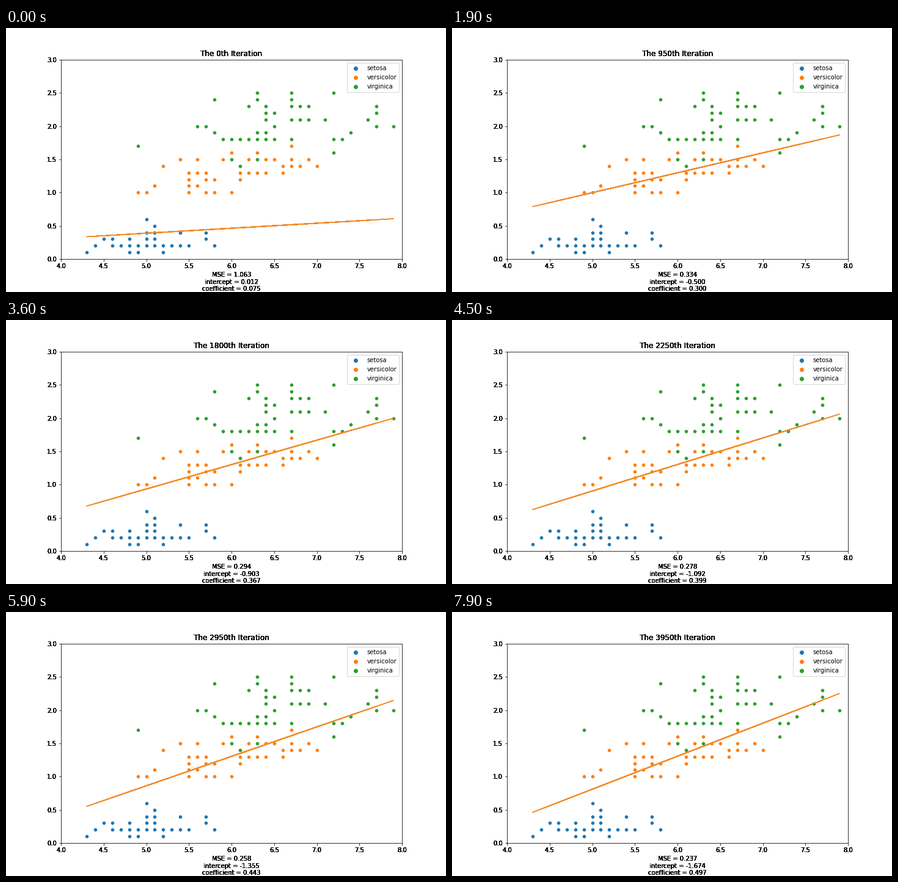
Recreate the animation shown at these times as a matplotlib script. Size 720x432 px, loop 8000 ms.

```python
import random

import matplotlib.pyplot as plt
from matplotlib.animation import FuncAnimation

plt.rcParams["font.family"] = "DejaVu Sans"

FRAMES, INTERVAL, STEPS = 80, 100, 50
RATE = 0.01

# Full-sample moments of x (sepal length) and y (petal width)
MEAN_X, MEAN_Y = 5.843333, 1.199333
VAR_X, VAR_Y, COV = 0.681122, 0.577133, 0.512829

# Rows of distinct points, in tenths: y -> x values
SPECIES = {
    "setosa": ("#1f77b4", {
        1: [43, 48, 49, 52],
        2: [44, *range(46, 56), 58],
        3: [45, 46, 48, 50, 51, 57],
        4: [50, 51, 54, 57],
        5: [51],
        6: [50],
    }),
    "versicolor": ("#ff7f0e", {
        10: [49, 50, 55, 57, 58, 60],
        11: [51, 55, 56],
        12: [55, 57, 58, 61],
        13: [55, 56, 57, 61, 62, 63, 64, 66],
        14: [52, 61, 66, 67, 68, 70],
        15: [54, 56, 59, 60, 62, 63, 64, 65, 67, 69],
        16: [60, 63],
        17: [67],
        18: [59],
    }),
    "virginica": ("#2ca02c", {
        14: [61],
        15: [60, 63],
        16: [72],
        17: [49],
        18: [*range(59, 66), 67, 72, 73],
        19: [58, 63, 64, 74],
        20: [56, 57, 65, 77, 79],
        21: [64, 67, 68, 69, 71, 76],
        22: [64, 65, 77],
        23: [62, 64, 67, 68, 69, 77],
        24: [58, 63, 67],
        25: [63, 67, 72],
    }),
}


def descend():
    """Gradient descent from zero; keep (intercept, slope) every STEPS steps."""
    a = b = 0.0
    kept = []
    for step in range((FRAMES - 1) * STEPS + 1):
        err = MEAN_Y - a - b * MEAN_X
        a, b = a + RATE * err, b + RATE * (COV - b * VAR_X + MEAN_X * err)
        if step % STEPS == 0:
            kept.append((a, b))
    return kept


def mse(a, b):
    bias = MEAN_Y - a - b * MEAN_X
    return bias ** 2 + VAR_Y - 2 * b * COV + b ** 2 * VAR_X


def harden(text, passes=7):
    """Overprint a text so that its soft edges turn black."""
    draw = text.draw

    def overprint(renderer):
        for _ in range(passes):
            draw(renderer)

    text.draw = overprint


fits = descend()
rng = random.Random(3)

fig, ax = plt.subplots(figsize=(10, 6), dpi=72, facecolor="white")
fig.subplots_adjust(left=0.125, right=0.9, bottom=0.125, top=0.88)
ax.set(xlim=(4, 8), ylim=(0, 3))
ax.set_xticks([4 + k / 2 for k in range(9)])
ax.set_yticks([k / 2 for k in range(7)])

# The fit is traced in sample order, so the stroke runs back and forth
trace = []
for name, (color, rows) in SPECIES.items():
    points = [(x / 10, y / 10) for y, xs in rows.items() for x in xs]
    rng.shuffle(points)
    xs, ys = zip(*points)
    trace += xs
    ax.scatter(xs, ys, s=36, color=color, edgecolor="white", linewidth=0.48)
    ax.scatter([], [], s=36, color=color, label=name)

line, = ax.plot([], [], color="#f28c28", lw=1.5)
ax.legend(loc="upper right")

for text in (ax.title, ax.xaxis.label, *ax.get_xticklabels(), *ax.get_yticklabels()):
    harden(text)


def update(i):
    a, b = fits[i]
    line.set_data(trace, [a + b * x for x in trace])
    ax.set_title(f"The {i * STEPS}th Iteration")
    ax.set_xlabel(f"MSE = {mse(a, b):.3f}\nintercept = {a:.3f}\ncoefficient = {b:.3f}")
    return line,


anim = FuncAnimation(fig, update, frames=FRAMES, interval=INTERVAL,
                     init_func=lambda: update(0), repeat=True, repeat_delay=0)
plt.show()
```
